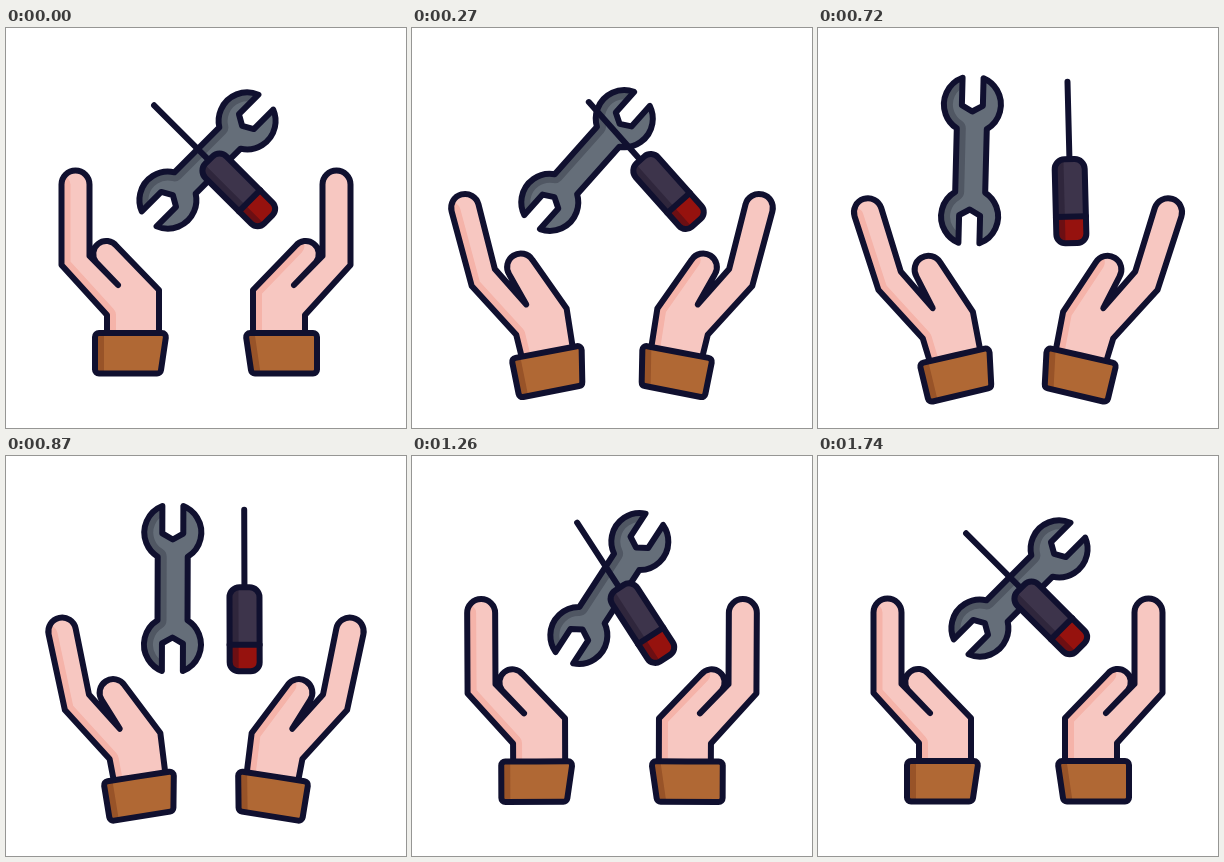
An HTML page with a canvas that plays this animation: 400 px wide and 400 px high, repeating every 3.77 s.

```html
<!DOCTYPE html>
<html lang="en">
<head>
<meta charset="utf-8">
<title>Tools and hands</title>
<style>
  html, body { margin: 0; height: 100%; overflow: hidden; background: #fff; }
  canvas { display: block; width: 100vmin; height: 100vmin; margin: auto; }
</style>
</head>
<body>
<canvas width="400" height="400"></canvas>
<script>
const ctx = document.querySelector('canvas').getContext('2d');
const LOOP = 3770, STEP = 30, LAST = 1740;
const INK = '#10102f';

// Tracks of [time, value], joined by a smooth curve
const SPREAD = [[0, 0], [270, .54], [510, .94], [630, 1], [720, .99],
                [1020, .39], [1260, .085], [1500, .01], [1740, 0]];
const TILT = [[0, 45], [135, 44.8], [270, 41.7], [510, 13.3], [720, 1.45],
              [840, 0], [1020, 6.5], [1260, 33], [1500, 44], [1740, 45]];

// Each joint: x, y with the hand closed, then x, y with it open
const HAND = {
  wristL: [101, 315, 115, 339], knuckle: [101, 287, 106, 317.5],
  elbow: [55.5, 237, 62, 269.5], tipL: [55.5, 156.5, 31, 198],
  tipR: [83.5, 156.5, 57.2, 187], web: [83.5, 228, 82.5, 248],
  crease: [112, 257, 115.5, 287], thumbL: [90, 234, 101.2, 253.3],
  thumbR: [110.5, 218, 125.7, 239.3], palm: [153, 262, 155.5, 290.5],
  wristR: [153, 315, 167, 335]
};
const CUFF = [[89, 305, 105.2, 344.5], [160.5, 305, 174.5, 324],
              [154.5, 345.5, 179, 363.8], [89, 345.5, 117.4, 383]];

const smooth = x => {
  x = Math.min(1, Math.max(0, x));
  return x * x * (3 - 2 * x);
};
const mix = (a, b, k) => a + (b - a) * k;
const pose = ([x, y, openX, openY], k) => [mix(x, openX, k), mix(y, openY, k)];

function slope(track, i) {
  if (i === 0 || i === track.length - 1) return 0;
  const [t0, v0] = track[i - 1], [t1, v1] = track[i], [t2, v2] = track[i + 1];
  const before = (v1 - v0) / (t1 - t0), after = (v2 - v1) / (t2 - t1);
  return before * after <= 0 ? 0 : (before + after) / 2;
}

function sample(track, t) {
  let i = 0;
  while (i < track.length - 2 && t > track[i + 1][0]) i++;
  const [t0, v0] = track[i], [t1, v1] = track[i + 1];
  const span = t1 - t0, u = (t - t0) / span;
  return mix(v0, v1, smooth(u)) +
    span * u * (1 - u) * ((1 - u) * slope(track, i) - u * slope(track, i + 1));
}

function polyline(points) {
  const path = new Path2D();
  points.forEach(p => path.lineTo(...p));
  return path;
}

function roundedPolygon(points, radius) {
  const path = new Path2D(), [a, b] = points;
  path.moveTo((a[0] + b[0]) / 2, (a[1] + b[1]) / 2);
  for (let i = 1; i <= points.length; i++) {
    const corner = points[i % points.length], next = points[(i + 1) % points.length];
    path.arcTo(...corner, ...next, radius);
  }
  path.closePath();
  return path;
}

// Half circle from a to b
function cap(path, a, b) {
  const dx = a[0] - b[0], dy = a[1] - b[1], angle = Math.atan2(dy, dx);
  path.arc((a[0] + b[0]) / 2, (a[1] + b[1]) / 2, Math.hypot(dx, dy) / 2, angle, angle + Math.PI);
}

function ink(path) {
  ctx.strokeStyle = INK;
  ctx.lineWidth = 6;
  ctx.stroke(path);
}

// Fill, a darker band along one edge, then the outline
function paint(shape, fill, edge, shade, details) {
  ctx.save();
  ctx.clip(shape);
  ctx.fillStyle = fill;
  ctx.fill(shape);
  if (details) details();
  ctx.strokeStyle = shade;
  ctx.lineWidth = 18;
  ctx.stroke(edge);
  ctx.restore();
  ink(shape);
}

function drawHand(k, mirrored) {
  const j = {};
  for (const name in HAND) j[name] = pose(HAND[name], k);
  const hand = polyline([j.wristL, j.knuckle, j.elbow, j.tipL]);
  cap(hand, j.tipL, j.tipR);
  [j.web, j.crease, j.thumbL].forEach(p => hand.lineTo(...p));
  cap(hand, j.thumbL, j.thumbR);
  [j.palm, j.wristR].forEach(p => hand.lineTo(...p));
  hand.closePath();

  const cuff = CUFF.map(p => pose(p, k));
  const handEdge = mirrored ? [j.wristR, j.palm, j.thumbR] : [j.wristL, j.knuckle, j.elbow, j.tipL];
  const cuffEdge = mirrored ? [cuff[1], cuff[2]] : [cuff[0], cuff[3]];

  ctx.save();
  if (mirrored) ctx.transform(-1, 0, 0, 1, 400, 0);
  paint(hand, '#f7c7c1', polyline(handEdge), '#f5b3a9');
  paint(roundedPolygon(cuff, 4), '#b06834', polyline(cuffEdge), '#985328');
  ctx.restore();
}

function wrenchPaths() {
  const R = 28.5, jaw = 10.5, PI = Math.PI;
  const p = Math.acos(jaw / R), q = Math.acos(15 / R);
  const edge = new Path2D();
  edge.arc(0, -56, R, PI + p, PI - q, true);
  edge.arc(0, 56, R, PI + q, PI - p, true);
  const shape = new Path2D(edge);
  [[-jaw, 55], [0, 49], [jaw, 55]].forEach(c => shape.lineTo(...c));
  shape.arc(0, 56, R, p, -q, true);
  shape.arc(0, -56, R, q, -p, true);
  [[jaw, -55], [0, -49], [-jaw, -55]].forEach(c => shape.lineTo(...c));
  shape.closePath();
  return { shape, edge };
}

const wrench = wrenchPaths();
const rod = polyline([[0, -80.5], [0, -3]]);
const handle = new Path2D();
handle.roundRect(-15, -3, 30, 84, [10, 10, 9, 9]);
const handleEdge = polyline([[-15, -12], [-15, 90]]);
const divider = polyline([[-15, 54.5], [15, 54.5]]);

function drawWrench() {
  paint(wrench.shape, '#656e79', wrench.edge, '#505763');
}

function drawScrewdriver() {
  ink(rod);
  paint(handle, '#3d344b', handleEdge, 'rgba(20, 10, 30, .32)', () => {
    ctx.fillStyle = '#96120e';
    ctx.fillRect(-15, 54.5, 30, 30);
  });
  ink(divider);
}

function place(x, y, degrees, draw) {
  ctx.save();
  ctx.translate(x, y);
  ctx.rotate(degrees * Math.PI / 180);
  draw();
  ctx.restore();
}

function render(now) {
  const t = Math.min(LAST, Math.floor(now % LOOP / STEP) * STEP);
  const open = t < 450 ? smooth(t / 450) : 1 - smooth((t - 450) / 870);
  const spread = sample(SPREAD, t), tilt = sample(TILT, t);

  ctx.fillStyle = '#fff';
  ctx.fillRect(0, 0, 400, 400);
  ctx.lineJoin = ctx.lineCap = 'round';
  drawHand(open, false);
  drawHand(open, true);
  place(201.5 - 49 * spread, 132.5, tilt, drawWrench);
  place(205 + 47 * spread, 134.2, -tilt, drawScrewdriver);
}

const start = performance.now();
function tick() {
  render(performance.now() - start);
  requestAnimationFrame(tick);
}
tick();
</script>
</body>
</html>
```
